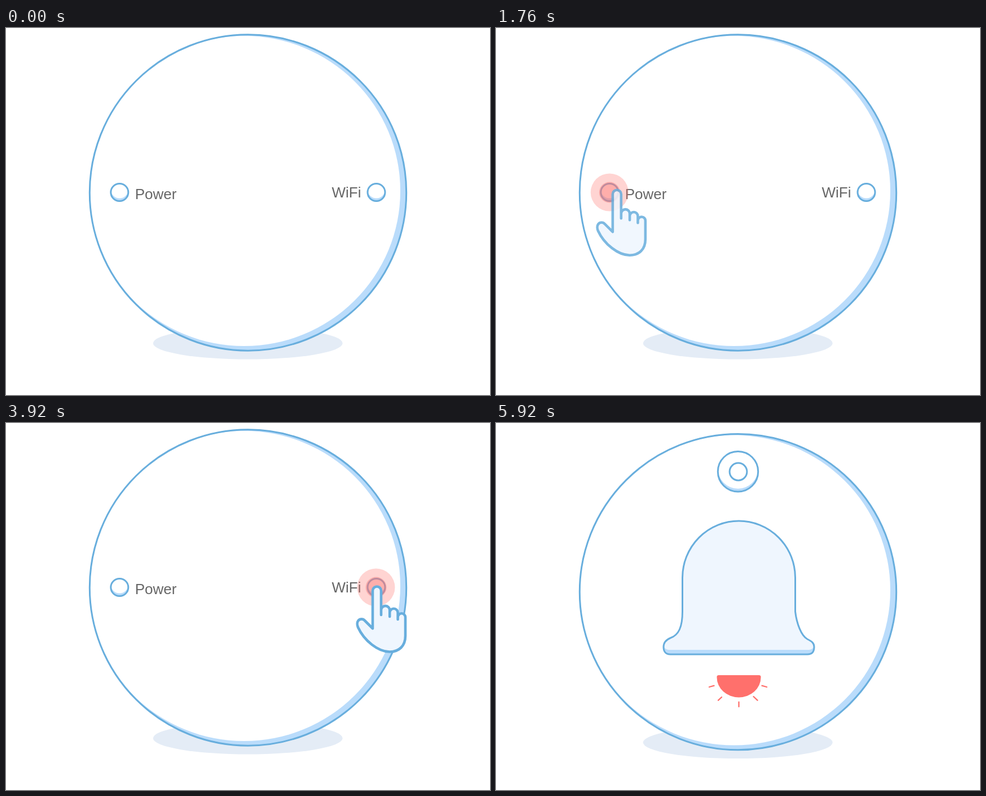
An HTML page for the animation above (7.6 s loop, 858x652 px).

```html
<!DOCTYPE html>
<html lang="en">
<head>
<meta charset="utf-8">
<title>Device flip</title>
<style>
  html, body { margin: 0; width: 100%; height: 100%; overflow: hidden; background: #fff; }
  svg { position: absolute; left: 0; top: 0; transform-origin: 429px 225px; }
  .line { fill: none; stroke: #68aedd; stroke-width: 3; stroke-linecap: round; stroke-linejoin: round; }
  .shade { fill: #badcfb; }
  .pale { fill: #eff6fe; }
  .white { fill: #fff; }
  .red { fill: #ff706c; }
  text { font: 26px "Liberation Sans", Arial, sans-serif; fill: #666; }
</style>
</head>
<body>
<!-- Shared shapes stay outside the faces, so hiding a face does not affect them. -->
<svg width="0" height="0">
  <defs>
    <clipPath id="discClip"><circle cx="429" cy="292.5" r="280.5"/></clipPath>
    <clipPath id="buttonClip"><circle r="15.5"/></clipPath>
    <clipPath id="lensClip"><circle cx="429" cy="86.3" r="35.7"/></clipPath>
    <path id="bell" d="M330.5 275A100 101 0 0 1 530.5 275V335C533 356 541 378 552 384C560 388 564 391 564 398C564 407 560 411 552 411H309C301 411 297 406 297 398C297 390 302 385 309 382C324 377 330.5 362 330.5 335Z"/>
    <clipPath id="bellClip"><use href="#bell"/></clipPath>
    <g id="disc">
      <ellipse cx="428.7" cy="560" rx="168" ry="28.5" fill="#e4ecf6"/>
      <circle class="shade" cx="429" cy="292.5" r="280.5"/>
      <ellipse class="white" cx="422" cy="289.5" rx="277" ry="275.5" clip-path="url(#discClip)"/>
      <circle class="line" cx="429" cy="292.5" r="280.7"/>
    </g>
    <g id="button">
      <circle class="shade" r="15.5"/>
      <circle class="white" cy="-5" r="15.5" clip-path="url(#buttonClip)"/>
      <circle class="line" r="15.5"/>
    </g>
  </defs>
</svg>

<svg id="front" width="858" height="652" viewBox="0 0 858 652">
  <use href="#disc"/>
  <use href="#button" x="201.3" y="292"/>
  <use href="#button" x="656.5" y="292"/>
  <text x="228.7" y="304">Power</text>
  <text x="577.5" y="301">WiFi</text>
  <g id="ripple" class="red">
    <circle id="halo" fill-opacity=".3"/>
    <circle id="core" fill-opacity=".38"/>
  </g>
  <path id="hand" class="line" style="fill:#eff6fe;stroke-width:4.6" d="M30 77V10a7.5 7.5 0 0 1 15 0V53V44.5a7.6 7.6 0 0 1 15.2 0V56V49a7.2 7.2 0 0 1 14.4 0V61V57a6.7 6.7 0 0 1 13.4 0V90C88 108 77 118.5 60 118.5C40 118.5 15 99 4 75C2.5 71.5 2 66 4.5 63C7.5 59.5 13 59.5 16 63Z"/>
</svg>

<svg id="back" width="858" height="652" viewBox="0 0 858 652">
  <use href="#disc" y="7.6"/>
  <circle class="shade" cx="429" cy="86.3" r="35.7"/>
  <circle class="white" cx="429" cy="81" r="35.7" clip-path="url(#lensClip)"/>
  <circle class="line" cx="429" cy="86.3" r="35.7"/>
  <circle class="line" cx="429.5" cy="86.5" r="15.4"/>
  <use href="#bell" class="shade"/>
  <g clip-path="url(#bellClip)"><rect class="pale" x="297" y="170" width="267" height="233" rx="9"/></g>
  <use href="#bell" class="line"/>
  <path class="red" d="M395 448H466q4 0 3.5 4a39 35.5 0 0 1-78 0q-.5-4 3.5-4z"/>
  <path id="rays" fill="none" stroke="#ff706c" stroke-width="2.3" stroke-linecap="round"
    d="M378 469L386.5 466.7M394 492.7L400 487M430.5 495.7V504M456.5 486L463.5 492.7M471.5 466.7L480 469"/>
</svg>

<script>
const LOOP = 7600, STEP = 80, FLIP = 240;
const el = id => document.getElementById(id);

// Progress from 0 to 1 between two times.
const ramp = (t, from, to) => Math.min(1, Math.max(0, (t - from) / (to - from)));
const easeOut = p => 1 - (1 - p) ** 2;
const mix = (a, b, p) => a + (b - a) * p;

// The hand travels to a button, presses it, then fades, drifting away by `drift`.
const powerPress = {
  from: { x: 374, y: 357 }, to: { x: 164, y: 281 }, drift: { x: 89, y: 29 },
  appear: 320, arrive: 1200, press: 1380, leave: 1706, gone: 2080, buttonX: 201.3
};
const wifiPress = {
  from: { x: 403, y: 419 }, to: { x: 620, y: 288 }, drift: { x: 0, y: 0 },
  appear: 2560, arrive: 3484, press: 3520, leave: 4000, gone: 4240, buttonX: 656
};

function setAttributes(id, values) {
  for (const [name, value] of Object.entries(values)) el(id).setAttribute(name, value);
}

function drawHand(t, p) {
  const travel = ramp(t, p.appear, p.arrive);
  const exit = ramp(t, p.leave, p.gone);
  const place = axis => mix(p.from[axis], p.to[axis], travel) + p.drift[axis] * exit;
  const fadeIn = t < p.appear ? 0 : mix(.2, 1, ramp(t, p.appear, p.appear + 320));
  setAttributes("hand", {
    transform: `translate(${place("x")} ${place("y")})`,
    opacity: fadeIn * (1 - exit)
  });
}

function drawRipple(t, p) {
  const age = t - p.press;
  const grow = ramp(age, 0, 360);
  const fade = ramp(age, 400, 700);
  setAttributes("ripple", {
    transform: `translate(${p.buttonX} 292)`,
    opacity: ramp(age, 0, 160) * (1 - fade)
  });
  setAttributes("halo", { r: mix(15, 33.5, grow) - 5 * fade });
  setAttributes("core", { r: 18.5 * grow - 2 * fade });
}

function drawFace(id, visible, angle) {
  el(id).style.visibility = visible ? "visible" : "hidden";
  el(id).style.transform = angle ? `perspective(1189px) rotateY(${angle}deg)` : "none";
}

function draw(t) {
  const press = t < wifiPress.appear ? powerPress : wifiPress;
  drawHand(t, press);
  drawRipple(t, press);
  drawFace("front", t < 4640, -90 * easeOut(ramp(t, 4400, 4400 + FLIP)));
  drawFace("back", t >= 4800, 90 - 90 * easeOut(ramp(t, 4720, 4720 + FLIP)));
  setAttributes("rays", { opacity: ramp(t, 5440, 5920) });
}

const start = performance.now();
function tick() {
  const t = (performance.now() - start) % LOOP;
  draw(Math.floor(t / STEP) * STEP);
  requestAnimationFrame(tick);
}
tick();
</script>
</body>
</html>
```
